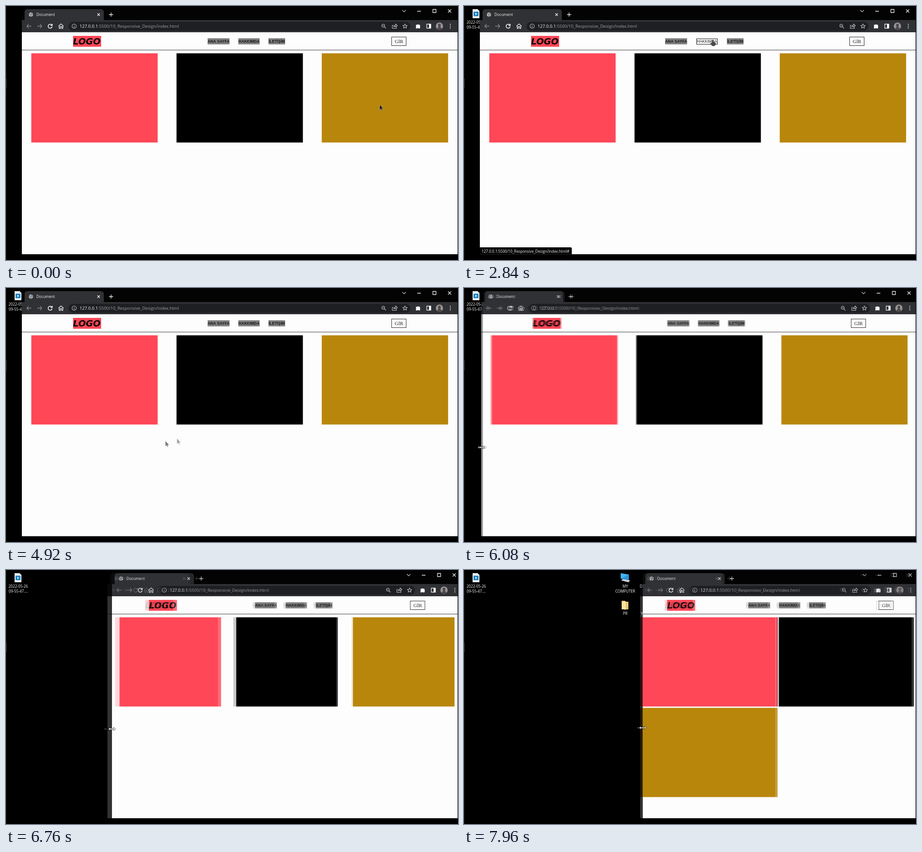
An HTML page with a canvas for the animation above (8 s loop, 998 by 561 pixels).

```html
<!DOCTYPE html>
<html lang="tr">
<head>
<meta charset="utf-8">
<title>Document</title>
<style>
html, body { margin: 0; width: 100%; height: 100%; overflow: hidden; background: #000; }
canvas { display: block; }
</style>
</head>
<body>
<canvas id="stage" width="998" height="561"></canvas>
<script>
const LOOP = 8000, STEP = 40, TICKS_PER_MS = .03;
const RIGHT = 997, BOTTOM = 548.5;
const UI = '"Open Sans", "Noto Sans", sans-serif';
const PAGE = '#fdfdfd', RED = '#ff4757', GOLD = '#b8860b';
const URL_HOST = '127.0.0.1', URL_REST = ':5500/10_Responsive_Design/index.html';
const STATUS_ON = 77, STATUS_OFF = 128, GRAB = 168;

const stage = document.getElementById('stage').getContext('2d');
const layer = document.createElement('canvas');
layer.width = 998;
layer.height = 561;
let c = stage;

// Tick (30 per second), then value(s); linear between keys.
const EDGE = [[181, 35], [182, 38], [183, 41.5], [194, 143.5], [196, 163], [211, 315],
  [212, 329.5], [225, 329.5], [237, 388.5], [238, 389], [239, 394.5]];
const POINTER = [[0, 825, 218], [24, 825, 218], [51, 640, 235], [69, 480, 130], [76, 458, 80],
  [80, 535, 80], [85, 549, 82], [90, 556, 80], [94, 598, 80], [99, 620, 80], [105, 866, 78],
  [113, 870, 79], [115, 882, 86], [116, 890, 97], [117, 897, 105], [132, 760, 250],
  [152, 250, 360], [GRAB, 34, 352], [196, 34, 352], [212, 34, 350], [239, 34, 348.5]];

function along(keys, t) {
  if (t <= keys[0][0]) return keys[0].slice(1);
  for (let i = 1; i < keys.length; i++) {
    const [a, b] = [keys[i - 1], keys[i]];
    if (t <= b[0]) return a.slice(1).map((v, k) => v + (b[k + 1] - v) * (t - a[0]) / (b[0] - a[0]));
  }
  return keys[keys.length - 1].slice(1);
}
const leftEdge = t => along(EDGE, t)[0];

function box(x, y, w, h, fill, radius = 0) {
  c.fillStyle = fill;
  c.beginPath();
  c.roundRect(x, y, w, h, radius);
  c.fill();
}
function frame(x, y, w, h, color, width = 1) {
  c.strokeStyle = color;
  c.lineWidth = width;
  c.strokeRect(x, y, w, h);
}
function text(s, x, y, font, fill, align = 'left') {
  c.font = font;
  c.fillStyle = fill;
  c.textAlign = align;
  c.fillText(s, x, y);
}
function icon(x, y, d, { stroke, fill, width = 1.3 }) {
  const path = new Path2D(d);
  c.save();
  c.translate(x, y);
  c.lineWidth = width;
  c.lineJoin = 'round';
  if (fill) { c.fillStyle = fill; c.fill(path); }
  if (stroke) { c.strokeStyle = stroke; c.stroke(path); }
  c.restore();
}
const ring = r => `M${r} 0A${r} ${r} 0 1 1 ${-r} 0A${r} ${r} 0 1 1 ${r} 0Z`;
const CROSS = 'M-3.5-3.5L3.5 3.5M3.5-3.5L-3.5 3.5';

function drawDesktop(t) {
  box(0, 0, 998, 561, '#000');
  box(0, 0, 1, 561, '#171705');
  box(0, 160, 1.3, 22, '#3c3c34');
  const label = (s, x, y) => text(s, x, y, `8.2px ${UI}`, '#fff', 'center');
  if (t >= STATUS_ON) {
    icon(19, 7, 'M0 0H11L15 4V20H0Z', { fill: '#f4f4f4' });
    box(21, 12.5, 11, 10, '#1583c7', 1);
    icon(25, 15, 'M0 0L4 2.5L0 5Z', { fill: '#fff' });
    label('2022-05-26', 27, 39);
    label('09-55-47....', 27, 50);
  }
  icon(346, 7, 'M0 0L18 3V15L0 12Z', { fill: '#43b4ee' });
  icon(346, 7, 'M0 12L18 3V15Z', { fill: '#2a97da' });
  icon(347, 20, 'M4 0L20 3L16 7L0 3Z', { fill: '#c9d5dd' });
  label('MY', 356, 39);
  label('COMPUTER', 356, 50);
  icon(348, 67, 'M0 1H7L9 3H15V20H0Z', { fill: '#e8c877' });
  icon(349, 68, 'M0 1H8V20L0 18Z', { fill: '#fbe3a0' });
  label('PR', 356, 99);
  label('D', 391, 39);
  label('V', 393, 99);
}

function drawChrome(left, width) {
  const light = { stroke: '#f1f1f1' }, dim = { stroke: '#85878a' }, soft = { stroke: '#c3c5c8', width: 1.1 };
  const span = RIGHT - left;
  box(left, 0, span, 58, '#030303');
  box(left + 6, 7, 175, 30, '#303134', 6);
  box(left, 31, span, 27, '#303134');
  box(left + 103, 35, width - 207, 20, '#1e1f22', 10);

  icon(left + 20, 19, ring(4.7), { fill: '#b9bcc0' });
  icon(left + 20, 19, 'M-4-1Q-1-2 0 1T-1 4M1-4Q0-1 4 0', { stroke: '#4a4b4e', width: 1.2 });
  text('Document', left + 32, 22, `8.4px ${UI}`, '#f3f3f3');
  icon(left + 169.5, 19, 'M-2.7-2.7L2.7 2.7M2.7-2.7L-2.7 2.7', light);
  icon(left + 197, 19, 'M-4.5 0H4.5M0-4.5V4.5', light);

  icon(left + 16, 44.5, 'M5 0H-5M-1-4.5L-5 0L-1 4.5', dim);
  icon(left + 39, 44.5, 'M-5 0H5M1-4.5L5 0L1 4.5', dim);
  icon(left + 62.5, 44.5, 'M3.5-2.5A4.4 4.4 0 1 0 4.3 1M4.5-5V-1.3H.8', { stroke: '#fff', width: 1.6 });
  icon(left + 86.5, 44.5, 'M-5.5 0L0-5L5.5 0M-4-1V5H-1.5V1H1.5V5H4V-1', light);
  icon(left + 115.5, 44.5, ring(4.7) + 'M0-.5V3M0-2.8V-1.7', soft);
  text(URL_HOST, left + 127.5, 48, `9.55px ${UI}`, '#f5f5f5');
  const hostWidth = c.measureText(URL_HOST).width;
  text(URL_REST, left + 127.5 + hostWidth, 48, `9.55px ${UI}`, '#9da1a6');

  const shift = left + width - RIGHT;
  const at = (x, y, d, style) => icon(x + shift, y, d, style);
  at(879, 11, 'M-4-2L0 2L4-2', soft);
  at(912, 11.5, 'M-4 0H4', light);
  at(946, 11, 'M-3.5-3.5H3.5V3.5H-3.5Z', light);
  at(979.5, 11, CROSS, light);
  at(833, 43.5, ring(3.2) + 'M2.3 2.3L6 6M-1.5 0H1.5', soft);
  at(858, 44.5, 'M-3-2H-5V5H4V2M-2 2Q-2-2 2-2V-5L6-1L2 2V0Q-1 0-2 2', soft);
  at(881, 44.5, 'M0-5L1.4-1.6L5-1.5L2.2.8L3.2 4.5L0 2.4L-3.2 4.5L-2.2.8L-5-1.5L-1.4-1.6Z', soft);
  at(910, 44.5, 'M-5-3H-2A2 2 0 0 1 1.5-3H4V0A2 2 0 0 1 4 3V5H1A2 2 0 0 0-2 5H-5V2A2 2 0 0 0-5-1Z', { fill: '#fff' });
  at(933.5, 44.5, 'M-4.5-4.5H4.5V4.5H-4.5Z', light);
  at(936, 44.5, 'M-2-4.5H2V4.5H-2Z', { fill: '#fff' });
  at(957, 44.5, ring(8), { fill: '#979495' });
  at(957, 44.5, 'M-3-2A3 3.5 0 1 1 3-2Q3 1 1.5 2Q5 3 5 6Q0 10-5 6Q-5 3-1.5 2Q-3 1-3-2Z', { fill: '#4c4849' });
  for (const y of [-4, 0, 4]) at(981, 44.5 + y, ring(1.1), { fill: '#f1f1f1' });
}

function hovered([x, y]) {
  if (y < 68 || y > 88) return '';
  if (x >= 851 && x <= 884) return 'GİR';
  if (y < 71 || y > 85) return '';
  if (x >= 445 && x <= 494) return 'ANA SAYFA';
  if (x >= 513 && x <= 560) return 'HAKKIMDA';
  return x >= 579 && x <= 616 ? 'İLETİŞİM' : '';
}

function drawPage(left, width, hover) {
  box(left, 58, RIGHT - left, BOTTOM - 58, PAGE);

  // Header items are spread with equal space around each.
  const gap = (width - 284) / 6;
  const logo = left + gap, nav = left + 3 * gap + 62, button = left + 5 * gap + 251;
  box(logo, 66, 62, 24, RED);
  text('LOGO', logo, 85.3, 'italic bold 19.5px "DejaVu Sans", sans-serif', '#0b0508');

  const links = [['ANA SAYFA', 9.2, 48.3], ['HAKKIMDA', 77, 47], ['İLETİŞİM', 143.5, 36.8]];
  const active = links.findIndex(link => link[0] === hover);
  links.forEach(([name, dx, w], i) => {
    const x = nav + dx + (active < 0 ? 0 : Math.sign(i - active));
    const on = i === active;
    if (on) frame(x + .5, 72.5, w - 1, 12, '#111');
    else box(x, 71.3, w, 13.4, '#808080');
    text(name, x + w / 2, 81.3, `${on ? '' : 'bold '}8.5px "Liberation Sans", Arial, sans-serif`, '#151515', 'center');
  });

  const lit = hover === 'GİR';
  if (lit) box(button, 68, 33, 20, '#6b6b6d');
  frame(button + .5, 68.5, 32, 19, '#262626');
  text('GİR', button + 16.7, 82, `${lit ? 'bold ' : ''}11px "Liberation Serif", serif`, lit ? '#a9a9ab' : '#222', 'center');
  box(left, 96.7, RIGHT - left, 1, '#333');

  const wide = width > 760;
  const card = width * (wide ? .29 : .49);
  const margin = wide ? (width - 3 * card) / 6 : 0;
  const pitch = card + (wide ? 2 * margin : 3);
  box(left + margin, 104.5, card, 197, RED);
  box(left + margin + pitch, 104.5, card, 197, '#000');
  if (wide) box(left + margin + 2 * pitch, 104.5, card, 197, GOLD);
  else box(left, 304.5, card, 197, GOLD);
}

function drawPointer(t, left) {
  const [x, y] = along(POINTER, t);
  if (t >= GRAB) {
    icon(left, y, 'M-8 0L-4-3.5V-1.2H4V-3.5L8 0L4 3.5V1.2H-4V3.5Z', { fill: '#fff', stroke: '#222', width: 1 });
  } else if (hovered([x, y])) {
    icon(x, y, 'M-1-6Q0-8 1-6V-2L5-1Q7 0 6 3L4 6H-1L-5 1Q-4-1-2 1Z', { fill: '#4b4b4b', stroke: '#222', width: .8 });
  } else {
    icon(x, y, 'M0 0V11.5L2.6 9.2L4.4 13L6.2 12.2L4.5 8.4H8Z', { fill: '#161616', stroke: '#b5b5b5', width: .7 });
  }
}

function drawScene(t) {
  const left = leftEdge(t);
  const width = RIGHT - leftEdge(t - 1); // layout trails the dragged edge
  drawDesktop(t);
  c.save();
  c.beginPath();
  c.rect(left, 0, RIGHT - left, BOTTOM);
  c.clip();
  drawPage(left, width, hovered(along(POINTER, t - 3)));
  drawChrome(left, width);
  if (t >= STATUS_ON && t < STATUS_OFF) {
    box(left, 533, 203, 16, '#050505', [0, 3, 0, 0]);
    text(URL_HOST + URL_REST + '#', left + 4, 544.5, `8.2px ${UI}`, '#f1f1f1');
  }
  c.restore();
  drawPointer(t, left);
}

const next = layer.getContext('2d');
const start = performance.now();
let shown = -1;
function tick() {
  const time = Math.floor((performance.now() - start) % LOOP / STEP) * STEP;
  if (time !== shown) {
    shown = time;
    // Times between two ticks show a mix of both.
    const now = time * TICKS_PER_MS, base = Math.floor(now + 1e-6);
    c = stage;
    drawScene(base);
    c = next;
    drawScene(base + 1);
    stage.globalAlpha = Math.max(0, now - base);
    stage.drawImage(layer, 0, 0);
    stage.globalAlpha = 1;
  }
  requestAnimationFrame(tick);
}
tick();
</script>
</body>
</html>
```
